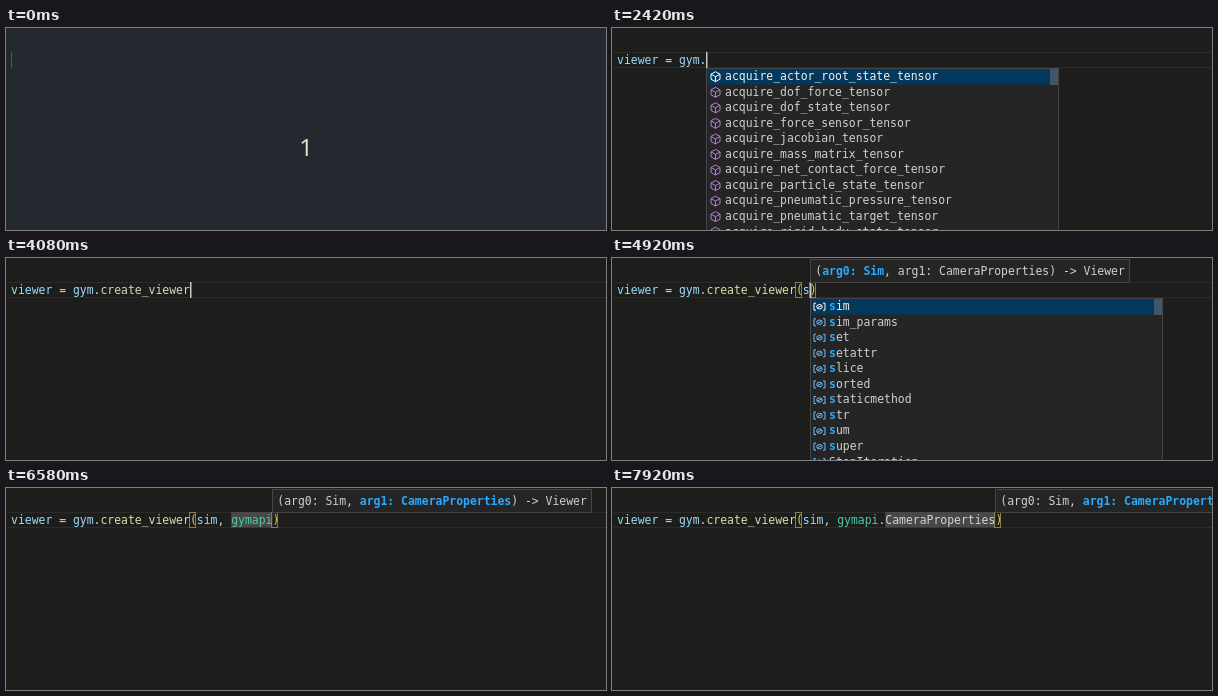
An HTML page with a canvas for the animation above (8000 ms loop, 600 by 202 pixels).

```html
<!DOCTYPE html>
<html lang="en">
<head>
<meta charset="utf-8">
<style>
html, body { margin: 0; width: 100%; height: 100%; overflow: hidden; background: #1d1d1b; }
canvas { display: block; }
</style>
</head>
<body>
<canvas id="stage" width="600" height="202"></canvas>
<script>
const ctx = document.getElementById('stage').getContext('2d');
const LOOP = 8000, LEFT = 5, CHAR = 6.88, ROW = 15.55, LIST_WIDTH = 353;
const FONT = '11.43px "DejaVu Sans Mono", monospace';
const PLAIN = '#d4d4d4', BLUE = '#2aaaff', VARIABLE = '#9cdcfe';
const ICON_COLORS = { method: '#b180d7', class: '#ee9d28', variable: '#75beff' };
const words = (kind, text) => ({ kind, items: text.split(' ') });

const lists = {
  v: words('variable', 'vars viewer ValueError envs'),
  viewer: words('variable', 'viewer'),
  g: words('variable', 'gym gymapi gymutil globals'),
  members: words('method', 'acquire_actor_root_state_tensor acquire_dof_force_tensor ' +
    'acquire_dof_state_tensor acquire_force_sensor_tensor acquire_jacobian_tensor ' +
    'acquire_mass_matrix_tensor acquire_net_contact_force_tensor acquire_particle_state_tensor ' +
    'acquire_pneumatic_pressure_tensor acquire_pneumatic_target_tensor ' +
    'acquire_rigid_body_state_tensor add_ground add_heightfield'),
  create: words('method', 'create_actor create_asset create_box create_camera_sensor ' +
    'create_capsule create_cloth_grid create_env create_performance_timers ' +
    'create_rigid_body_attractor create_sim create_sphere create_tet_grid create_viewer'),
  createV: words('method', 'create_viewer create_env'),
  s: words('variable', 'sim sim_params set setattr slice sorted staticmethod str sum super ' +
    'StopIteration SyntaxError SystemError'),
  sim: words('variable', 'sim sim_params sim_type'),
  types: words('class', 'ActionEvent AssetOptions AttractorProperties CameraFollowMode ' +
    'CameraProperties ContactCollection CoordinateSpace DofDriveMode Env ForceSensor ' +
    'Gym HeightFieldParams IndexDomain'),
  camera: words('class', 'CameraFollowMode CameraProperties CapsuleParams CallbackMode CacheOptions')
};

// [start ms, text before the caret, suggestion list, options]
const CALL = 'viewer = gym.create_viewer(';
const steps = [
  [0, '', null, { intro: 1, caret: .3 }],
  [80, '', null, { intro: .5, caret: .6 }],
  [170, ''],
  [500, '', null, { caret: 0 }],
  [670, 'v', 'v'],
  [830, 'vie', 'viewer'],
  [920, 'viewe', 'viewer'],
  [1000, 'viewer', 'viewer'],
  [1330, 'viewer '],
  [1420, 'viewer ='],
  [1500, 'viewer = '],
  [1580, 'viewer = g', 'g'],
  [1670, 'viewer = gy', 'g'],
  [2000, 'viewer = gym'],
  [2330, 'viewer = gym.'],
  [2420, 'viewer = gym.', 'members'],
  [2580, 'viewer = gym.c', 'create'],
  [2670, 'viewer = gym.cr', 'create'],
  [2830, 'viewer = gym.cre', 'create'],
  [2920, 'viewer = gym.crea', 'create'],
  [3000, 'viewer = gym.creat', 'create'],
  [3170, 'viewer = gym.create', 'create'],
  [3330, 'viewer = gym.create_', 'create'],
  [3500, 'viewer = gym.create_v', 'createV'],
  [4000, 'viewer = gym.create_viewer'],
  [4330, CALL],
  [4420, CALL, null, { arg: 0 }],
  [4830, CALL + 's', 's', { arg: 0 }],
  [5000, CALL + 'si', 'sim', { arg: 0 }],
  [5080, CALL + 'sim', 'sim', { arg: 0 }],
  [5330, CALL + 'sim,', null, { arg: 0 }],
  [5500, CALL + 'sim, ', null, { arg: 0 }],
  [5830, CALL + 'sim, g', 'g', { arg: 1 }],
  [5920, CALL + 'sim, gy', 'g', { arg: 1 }],
  [6000, CALL + 'sim, gym', 'g', { arg: 1 }],
  [6330, CALL + 'sim, gymapi', null, { arg: 1 }],
  [6500, CALL + 'sim, gymapi', null, { arg: 1, caret: 0, marked: true }],
  [6670, CALL + 'sim, gymapi.', 'types', { arg: 1 }],
  [6830, CALL + 'sim, gymapi.C', 'camera', { arg: 1 }],
  [7000, CALL + 'sim, gymapi.Ca', 'camera', { arg: 1 }],
  [7420, CALL + 'sim, gymapi.Ca', 'camera', { arg: 1, selected: 1 }],
  [7830, CALL + 'sim, gymapi.CameraProperties', null, { arg: 1 }],
  [7920, CALL + 'sim, gymapi.CameraProperties', null, { arg: 1, caret: 0, marked: true }]
];

const columnX = column => LEFT + column * CHAR;
const lastWord = text => text.match(/\w*$/)[0];

function rect(x, y, w, h, color) {
  ctx.fillStyle = color;
  ctx.fillRect(x, y, w, h);
}

function frame(x, y, w, h, color) {
  ctx.strokeStyle = color;
  ctx.lineWidth = 1;
  ctx.strokeRect(x + .5, y + .5, w - 1, h - 1);
}

function write(text, x, y, color, bold) {
  ctx.font = (bold ? 'bold ' : '') + FONT;
  ctx.fillStyle = color;
  ctx.fillText(text, x, y);
  return x + text.length * CHAR;
}

function panel(x, y, w, h) {
  rect(x, y, w, h, '#252526');
  frame(x, y, w, h, '#454545');
}

function tokenColor(token, called) {
  if (/^[()]$/.test(token)) return '#e3c73a';
  if (token === 'gymapi') return '#4ec9b0';
  if (token === 'create_viewer') return called ? '#dcdcaa' : '#d9d8bc';
  if (/^[a-z]/.test(token) && !token.startsWith('c')) return VARIABLE;
  return PLAIN;
}

function drawCode(text, { marked, caret = 1 }) {
  const end = columnX(text.length);
  const called = text.includes('(');
  if (marked) {
    const width = lastWord(text).length * CHAR;
    rect(end - width, 24, width, 15.5, '#484846');
  }
  if (called) {
    for (const x of [columnX(text.indexOf('(')), end]) {
      frame(Math.round(x) - 1, 24, 7, 16, '#858058');
    }
  }
  let x = LEFT;
  for (const token of (text + (called ? ')' : '')).match(/\w+|\s+|[^\w\s]/g) || []) {
    x = write(token, x, 36, tokenColor(token, called));
  }
  ctx.globalAlpha = caret;
  rect(Math.round(end), 24, 1.5, 16, '#c6c6c2');
  ctx.globalAlpha = 1;
}

function drawIcon(kind, x, y, color) {
  ctx.strokeStyle = color;
  ctx.lineWidth = 1;
  ctx.beginPath();
  if (kind === 'method') {
    const shape = new Path2D('M0-5L4.5-2.5V2.5L0 5L-4.5 2.5V-2.5ZM-4.5-2.5L0 0L4.5-2.5M0 0V5');
    ctx.save();
    ctx.translate(x, y);
    ctx.stroke(shape);
    ctx.restore();
  } else if (kind === 'variable') {
    for (const side of [-1, 1]) {
      ctx.moveTo(x + side * 3.5, y - 3.5);
      ctx.lineTo(x + side * 5.5, y - 3.5);
      ctx.lineTo(x + side * 5.5, y + 3.5);
      ctx.lineTo(x + side * 3.5, y + 3.5);
    }
    ctx.moveTo(x + 2.8, y);
    ctx.ellipse(x, y, 2.8, 2.2, 0, 0, 7);
    ctx.moveTo(x - 2, y + 1);
    ctx.lineTo(x + 2, y - 1);
    ctx.stroke();
  } else {
    ctx.rect(x - 4.5, y - 3, 4, 4);
    ctx.rect(x + 2, y - 4, 2.5, 2.5);
    ctx.rect(x + 2, y + 1.5, 2.5, 2.5);
    ctx.moveTo(x - .5, y - 1);
    ctx.lineTo(x + 2, y - 2.5);
    ctx.moveTo(x - .5, y);
    ctx.lineTo(x + 2, y + 2.5);
    ctx.stroke();
  }
}

function drawSuggestions(text, { kind, items }, selected = 0) {
  const x = Math.round(columnX(text.length));
  const typed = lastWord(text);
  panel(x, 40, LIST_WIDTH, Math.round(items.length * ROW + 3));
  items.forEach((item, i) => {
    const top = 41 + i * ROW, active = i === selected;
    if (active) rect(x + 1, top, LIST_WIDTH - 2, ROW, '#04395e');
    drawIcon(kind, x + 9.5, top + 7.7, active ? '#fff' : ICON_COLORS[kind]);
    const matched = item.startsWith(typed) ? typed.length : 0;
    const next = write(item.slice(0, matched), x + 19, top + 11, BLUE, true);
    write(item.slice(matched), next, top + 11, active ? '#f0f0f0' : '#d0d0d0');
  });
  if (items.length > 12) rect(x + LIST_WIDTH - 9, 41, 8, 16, 'rgba(121,121,121,.5)');
}

function drawSignature(text, arg) {
  const left = Math.round(columnX(text.length));
  panel(left, 1, 320, 24);
  let x = left + 5.3;
  ['(', 'arg0: Sim', ', ', 'arg1: CameraProperties', ') -> Viewer'].forEach((part, i) => {
    const active = i === 1 + 2 * arg;
    x = write(part, x, 16.5, active ? BLUE : '#d0d0d0', active);
  });
}

function drawIntro(opacity) {
  ctx.globalAlpha = opacity;
  rect(0, 0, 600, 202, '#23292e');
  rect(5, 24, 1, 16, '#50545a');
  ctx.font = '24px "Noto Sans", sans-serif';
  ctx.textAlign = 'center';
  ctx.fillStyle = '#e6dcc3';
  ctx.fillText('1', 300, 128);
  ctx.textAlign = 'left';
  ctx.globalAlpha = 1;
}

function render(time) {
  const [, text, list, options = {}] = steps.findLast(([start]) => start <= time);
  rect(0, 0, 600, 202, '#1d1d1b');
  rect(1, 24, 599, 1, '#2b2b29');
  rect(1, 39, 599, 1, '#2b2b29');
  drawCode(text, options);
  if (list) drawSuggestions(text, lists[list], options.selected);
  if ('arg' in options) drawSignature(text, options.arg);
  if (options.intro) drawIntro(options.intro);
}

const began = performance.now();
function tick() {
  render((performance.now() - began) % LOOP);
  requestAnimationFrame(tick);
}
tick();
</script>
</body>
</html>
```
